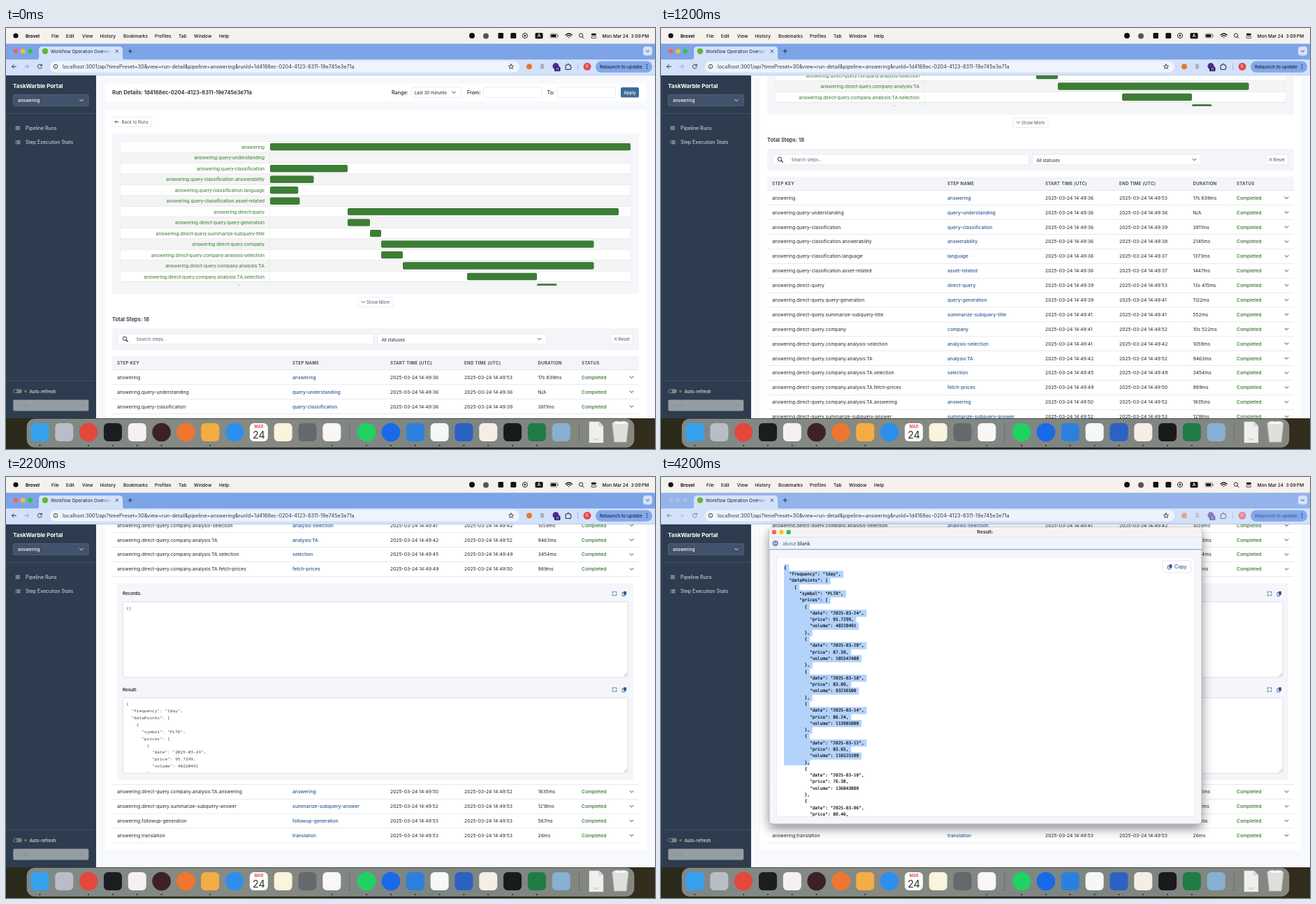
Animation of 929x603 px, one loop 6200 ms. Source, as an HTML page:

```html
<!DOCTYPE html>
<html lang="en">
<head>
<meta charset="utf-8">
<title>Run details</title>
<style>
  html, body { margin: 0; width: 100%; height: 100%; overflow: hidden; }
  svg { display: block; width: 929px; height: 603px; }
  text { white-space: pre; }
  .dense text { stroke: #111; stroke-width: .18px; }
</style>
</head>
<body>
<script>
const UI = 'Inter, sans-serif', CHART = 'Roboto, sans-serif';
const AREA_MONO = "'Noto Sans Mono', monospace", POPUP_MONO = "'DejaVu Sans Mono', monospace";
const INK = '#20252d', SLATE = '#4a5563', LINK = '#2b5797', GREEN = '#3d7d36', SELECTED = '#b3d3fb';

const rect = (x, y, w, h, fill, r = 0, stroke = 'none', sw = .6) =>
  `<rect x="${x}" y="${y}" width="${w}" height="${h}" rx="${r}" fill="${fill}" stroke="${stroke}" stroke-width="${sw}"/>`;
const circle = (x, y, r, fill, stroke = 'none') =>
  `<circle cx="${x}" cy="${y}" r="${r}" fill="${fill}" stroke="${stroke}" stroke-width=".9"/>`;
const path = (d, stroke = INK, sw = .9, fill = 'none') =>
  `<path d="${d}" stroke="${stroke}" stroke-width="${sw}" fill="${fill}" stroke-linecap="round" stroke-linejoin="round"/>`;
// y is the vertical middle of the capitals
const text = (x, y, s, { size = 6.77, weight = 400, fill = INK, font = UI, anchor = 'start', spacing = 0, id = '' } = {}) =>
  `<text ${id && `id="${id}"`} x="${x}" y="${y + size * .36}" font-size="${size}" font-weight="${weight}" fill="${fill}" font-family="${font}" text-anchor="${anchor}" letter-spacing="${spacing}">${
    s.replace(/&/g, '&amp;')}</text>`;
const group = (body, attrs = '') => `<g ${attrs}>${body}</g>`;
const clip = (id, x, y, w, h) => `<clipPath id="${id}">${rect(x, y, w, h, '#000')}</clipPath>`;
const chevron = (x, y, color = INK, s = 2.4) => path(`M${x - s} ${y - s / 2}l${s} ${s}l${s} ${-s}`, color);
const field = (x, y, w, h) => rect(x, y, w, h, '#fff', 2, '#dcdfe6');
const lights = (x, y, gap, colors) => colors.map((c, i) => circle(x + i * gap, y, 3.2, c)).join('');
const LIGHTS = ['#fe5f57', '#febc2e', '#28c840'];
const expandIcon = (x, y) => path(
  `M${x - 2.7} ${y - 1}v-1.7h1.7M${x + 1} ${y - 2.7}h1.7v1.7M${x + 2.7} ${y + 1}v1.7h-1.7M${x - 1} ${y + 2.7}h-1.7v-1.7`, LINK, .9);
const copyIcon = (x, y) => rect(x - 3, y - 1.5, 4, 5, '#fff', .6, LINK, .9) + rect(x - 1, y - 3.2, 4, 5, LINK, .6);
const infoIcon = (x, y) => circle(x, y, 3, 'none', INK) + path(`M${x} ${y}v1.4M${x} ${y - 1.4}v.1`, INK, .8);

const steps = `answering|36|53|17s 839ms
answering.query-understanding|36|36|N/A
answering.query-classification|36|39|3811ms
answering.query-classification.answerability|36|38|2145ms
answering.query-classification.language|36|37|1373ms
answering.query-classification.asset-related|36|37|1447ms
answering.direct-query|39|53|13s 415ms
answering.direct-query.query-generation|39|41|1122ms
answering.direct-query.summarize-subquery-title|41|41|552ms
answering.direct-query.company|41|52|10s 522ms
answering.direct-query.company.analysis-selection|41|42|1059ms
answering.direct-query.company.analysis:TA|42|52|9463ms
answering.direct-query.company.analysis:TA.selection|45|49|3454ms
answering.direct-query.company.analysis:TA.fetch-prices|49|50|989ms
answering.direct-query.company.analysis:TA.answering|50|52|1835ms
answering.direct-query.summarize-subquery-answer|52|53|1218ms
answering.followup-generation|53|53|567ms
answering.translation|53|53|26ms`.split('\n').map(line => line.split('|'));

const bars = [[378, 894], null, [378, 489], [378, 440.5], [378, 418.3], [378, 420.5], [489, 877], [489, 521],
  [521, 537], [537, 841.5], [537, 568], [568, 841.5], [660, 760], [760, 788.5]];

const quotes = [['24', 95.7299, 40220491], ['20', 87.39, 105547400], ['18', 83.89, 93236500], ['14', 86.24, 113985000],
  ['12', 83.65, 116525100], ['10', 76.38, 136843800], ['06', 80.46, 0]];
const json = ['{', '  "frequency": "1day",', '  "dataPoints": [', '    {', '      "symbol": "PLTR",', '      "prices": [',
  ...quotes.flatMap(([day, price, volume]) => ['        {', `          "date": "2025-03-${day}",`,
    `          "price": ${price},`, `          "volume": ${volume}`, '        },'])];

const CHAR = 3.7;
const codeLines = (x, y, pitch, lines, style) => lines.map((s, i) => text(x, y + i * pitch, s, style)).join('');
const codeSelection = (x, y, pitch, lines) => lines.map((s, i) => {
  const isLast = i === lines.length - 1;
  return rect(x, y + (i - .5) * pitch, (s.length + (isLast ? 0 : 1)) * CHAR, pitch + (isLast ? 0 : 1), SELECTED);
}).join('');

const ROW = 20.89, FIRST_ROW = 500.3, OPEN_ROW = 13, DETAIL = 298;

function tableRow([key, start, end, duration], i) {
  const y = FIRST_ROW + i * ROW, time = s => '2025-03-24 14:49:' + s;
  return text(159, y, key) + text(410, y, key.split('.').pop(), { weight: 500, fill: LINK }) +
    text(550, y, time(start)) + text(656, y, time(end)) + text(761.5, y, duration) +
    text(824, y, 'Completed', { weight: 500, fill: '#2f6f2c' }) + chevron(895.5, y) +
    rect(152, y + 10.2, 754, .6, '#d9dce2');
}

function chart() {
  const pitch = 15.475;
  return rect(152, 151, 754, 230, '#f5f6f9', 2) + group(bars.map((bar, i) => {
    const y = 170.3 + i * pitch;
    return rect(164, y - pitch / 2, 730, pitch, i % 2 ? '#f4f4f4' : '#fff', 0, '#e1e2e4', .5) +
      text(370, y, steps[i][0], { size: 7.2, fill: '#3c8035', font: CHART, anchor: 'end' }) +
      (bar ? rect(bar[0], y - 5.2, bar[1] - bar[0], 10.4, GREEN, 2) : '');
  }).join('') + rect(377.5, 162.5, .5, 206, '#e1e2e4'), 'clip-path="url(#chartClip)"');
}

function pageTop() {
  const small = { size: 6.2 }, label = { size: 7.2, weight: 500 };
  const headings = [[159, 'STEP KEY'], [410, 'STEP NAME'], [550, 'START TIME (UTC)'], [656, 'END TIME (UTC)'], [761.5, 'DURATION'], [824, 'STATUS']];
  return rect(142, 80, 774, 25, '#fff', 3) +
    text(152, 92.5, 'Run Details: 1d4168ec-0204-4123-8311-19e745e3e71a', { size: 7.6, weight: 600 }) +
    text(552, 92.3, 'Range:', label) + field(580, 85, 72, 14.5) + text(584.5, 92.3, 'Last 30 minutes', small) + chevron(641, 92.3) +
    text(660, 92.3, 'From:', label) + field(683.5, 85, 83, 14.5) + text(774.5, 92.3, 'To:', label) + field(789.5, 85, 83, 14.5) +
    rect(880, 85, 26, 14.5, '#3b6c98', 2) + text(893, 92.3, 'Apply', { size: 6.3, weight: 500, fill: '#fff', anchor: 'middle' }) +
    group(rect(142, 117, 774, 759, '#fff', 3), 'id="card"') +
    field(152, 127.5, 56.5, 14) + path('M161 134.5h-5m2-2l-2 2l2 2', SLATE) + text(165.5, 134.5, 'Back to Runs', { size: 6.2, fill: SLATE }) +
    chart() +
    field(504, 385.5, 50, 14) + chevron(511.3, 392.5, SLATE) + text(516, 392.5, 'Show More', { size: 6.2, fill: SLATE }) +
    text(152, 417, 'Total Steps: 18', { size: 7.55, weight: 600, fill: '#2b323c' }) +
    rect(152, 430, 754, 31.5, '#f4f5f9', 2) + field(160, 438, 366.5, 14.8) +
    circle(170, 444.8, 2.8, 'none', INK) + path('M172.2 447l2.2 2.2', INK, 1.2) +
    text(186.5, 445.3, 'Search steps...', { size: 6.3, fill: '#59616c' }) +
    field(531.5, 438, 242, 14.8) + text(537.5, 446.3, 'All statuses', small) + chevron(763.5, 445.6) +
    field(866, 438.5, 31.5, 14) + path('M870.8 443.7l3.6 3.6m0-3.6l-3.6 3.6', SLATE, .8) + text(876.5, 445.5, 'Reset', { size: 6.2, fill: SLATE }) +
    rect(152, 470, 754, 19.6, '#f4f5f9') + rect(152, 489.4, 754, .6, '#d9dce2') +
    headings.map(([x, s]) => text(x, 479.6, s, { size: 6.1, weight: 600, spacing: .3, fill: '#353d48' })).join('');
}

// Detail panel, drawn at its place after scrolling
function detail() {
  const title = { size: 6.3, weight: 600 };
  const handle = y => path(`M889 ${y - 4}l-4 4M889 ${y - 2}l-2 2`, '#8b9098', .6);
  const code = { size: 6.17, font: AREA_MONO, fill: '#3c434d' };
  const area = (name, y) => text(167, y, name, title) + expandIcon(871, y) + copyIcon(885, y) +
    rect(167.3, y + 11.8, 723, 108, '#fff', 2.5, '#d5d9e0', .8) + handle(y + 118);
  return rect(159, 152, 739, 282, '#f5f6fa', 2) + area('Records:', 167) + text(172, 187.5, '{}', code) +
    group(rect(865.5, 299, 11, 11, '#d4e2f6', 2), 'id="expandFocus"') + area('Result:', 304.5) +
    group(group(codeSelection(172, 325, 9.89, json.slice(0, 12)), 'id="areaSelection"') +
      codeLines(172, 325, 9.89, json.slice(0, 11), code), 'clip-path="url(#areaClip)"') +
    group(rect(167.5, 316.5, 722.6, 107.2, 'none', 2.5, '#2c5fb3', 1.3), 'id="areaFocus"') +
    rect(152, 440.4, 754, .6, '#d9dce2');
}

function sidebar() {
  const pale = { size: 7, fill: '#dfe4ea' };
  const lines = (x, y, w) => path([-2, 0, 2].map(d => `M${x} ${y + d}h${w}`).join(''), '#dfe4ea', .8);
  return rect(0, 68, 129, 491, '#2d3c4e') +
    text(10, 82.8, 'TaskWarble Portal', { size: 8, weight: 700, fill: '#fff' }) +
    rect(10.3, 95.5, 108, 16, '#42526a', 2, '#64748a') + text(17, 103.5, 'answering', { size: 6.3, weight: 500, fill: '#fff' }) + chevron(108, 103.5, '#fff') +
    rect(0, 122, 129, .6, '#4b5b6d') +
    lines(14, 143.3, 5.5) + text(28, 143.3, 'Pipeline Runs', pale) +
    lines(15.5, 163.7, 4.5) + path('M13.8 161.7v.01M13.8 163.7v.01M13.8 165.7v.01', '#dfe4ea') + text(28, 163.7, 'Step Execution Stats', pale) +
    rect(0, 505, 129, .6, '#4b5b6d') +
    rect(10.3, 517.3, 12.5, 6, '#7b828a', 3) + circle(13.5, 520.3, 2.2, '#2f3c4b') + circle(28, 520.3, 1.9, '#3f8f49') +
    text(33.5, 520.3, 'Auto-refresh', { size: 6.3, fill: '#fff' }) +
    rect(10.3, 532.5, 108, 16, '#959ca4', 2) + text(17, 540.5, '5 sec', { size: 6.3, fill: '#858d96' }) + chevron(108, 540.5, '#7d858e');
}

function menuBar() {
  const items = [[65, 'File'], [86, 'Edit'], [109, 'View'], [134.5, 'History'], [168, 'Bookmarks'], [213, 'Profiles'], [247, 'Tab'], [269, 'Window'], [305, 'Help']];
  const black = '#111', size = 6.5;
  return rect(0, 0, 929, 22.5, '#f5f2ee') + circle(14, 11, 3.6, black) +
    text(28, 11.2, 'Brovel', { size, weight: 700, fill: black }) +
    items.map(([x, s]) => text(x, 11.2, s, { size, weight: 500, fill: black })).join('') +
    circle(667, 11, 4, black) + circle(687, 11.5, 4, '#555') + rect(704.5, 7, 7.5, 8, black, 1) + rect(722.3, 7, 8, 8, black, 1.5) +
    circle(743, 11, 3.6, 'none', black) + path('M742 9.4v3.2l2.6-1.6z', black, .3, black) +
    rect(757.5, 7, 11, 8.3, black, 1.5) + text(763, 11.2, 'A', { size: 6.3, weight: 600, fill: '#fff', anchor: 'middle' }) +
    rect(779, 8.2, 10.5, 5.8, '#f5f2ee', 1.6, '#555', .7) + rect(780, 9.2, 7.5, 3.8, black, .8) + rect(790, 10, .9, 2.2, '#777') +
    path('M801 10q4.6-4 9.2 0M802.8 11.9q2.8-2.4 5.6 0M805.5 13.7h.2', black, 1.3) +
    circle(823, 10.6, 2.7, 'none', black) + path('M825 12.6l2 2', black, 1) +
    rect(837.8, 7.8, 7, 2.8, black, 1.4) + rect(837.8, 11.8, 7, 2.8, '#f5f2ee', 1.4, black, .7) +
    text(853.5, 11.2, '', { size, weight: 500, fill: black, id: 'clock' });
}

function browser() {
  const star = 'M723 51.8l1 2.3l2.5.2l-1.9 1.6l.6 2.5l-2.2-1.4l-2.2 1.4l.6-2.5l-1.9-1.6l2.5-.2z';
  return `<rect id="strip" y="22.5" width="929" height="23"/>` +
    group(lights(14, 33.3, 10.3, LIGHTS), 'id="lightsOn"') + group(lights(14, 33.3, 10.3, Array(3).fill('#a9bde0')), 'id="lightsOff"') +
    path('M43 45.5q4 0 4-4v-10q0-5 5-5h110q5 0 5 5v10q0 4 4 4z', 'none', 0, '#d3e2fa') +
    circle(56, 33.2, 4.2, '#67b52f') +
    group(text(64, 33.3, 'Workflow Operation Overviews', { size: 6.4 }), 'clip-path="url(#tabClip)"') +
    rect(138, 27.5, 13, 12, 'url(#fade)') +
    path('M157 31.5l3.6 3.6m0-3.6l-3.6 3.6', INK, .8) + path('M175 33.2h5.4m-2.7-2.7v5.4', INK, .9) +
    rect(912, 26.5, 13, 13, '#d3e2fa', 4) + chevron(918.5, 33.3, INK, 2) +
    rect(0, 45.3, 929, 22.7, '#d3e2fa') + rect(0, 67.3, 929, .7, '#b4c5e3') +
    rect(63, 47.3, 672, 16.2, '#eef3fc', 8) + circle(71, 55.2, 5.5, '#fff') + infoIcon(71, 55.2) +
    text(81, 55.3, 'localhost:3001/api?timePreset=30&view=run-detail&pipeline=answering&runId=1d4168ec-0204-4123-8311-19e745e3e71a', { size: 7.25, fill: '#333a44' }) +
    path(star, INK, .8) +
    rect(844, 47.5, 81, 16.3, '#82a8ec', 8) +
    group(path('M14.5 55.2h-6m2.7-2.7l-2.7 2.7l2.7 2.7') + path('M26.5 55.2h6m-2.7-2.7l2.7 2.7l-2.7 2.7', '#8e9db8') +
      path('M51 53.6a3 3 0 1 0 .2 2.6M51.3 51.8v2.2h-2.2') +
      circle(749, 55.3, 4, '#e8772c') + rect(765, 51.5, 5, 7, '#a4b0c5', 1) +
      circle(787, 54.7, 4.6, '#4b2a9b') + rect(785, 55.5, 8.5, 6.5, '#33206d', 1.5) + text(789.2, 58.8, '11', { size: 5, fill: '#fff', anchor: 'middle' }) +
      path('M801.5 53h2.3q-.4-1.8 1-1.8t1 1.8h2.4v2.4q1.3 0 1.3 1t-1.3 1v2h-6.7z', INK, 1) +
      rect(818, 50.5, .8, 9.5, '#93afe0') + circle(832, 55.3, 5.5, '#e5484d') + text(832, 55.3, 'K', { size: 5.6, fill: '#fff', anchor: 'middle' }) +
      text(850, 55.3, 'Relaunch to update', { size: 6.6, weight: 500 }), 'id="tools"') +
    [52.6, 55.3, 58].map(y => circle(917.5, y, .8, INK)).join('');
}

function dock() {
  const icons = ['sq#36a1ee', 'sq#b9bdc6', 'ci#e4483b', 'sq#1c1d20', 'sq#f5f1f3', 'ci#3c2227', 'ci#ef7630', 'sq#f4ad45', 'ci#2d8fed', '',
    'sq#fbf4dc', 'sq#65696e', 'sq#f8f7f5', 'ci#20d262', 'ci#196ae8', 'sq#2c80dd', 'sq#f5f8f5', 'sq#2b62c4', 'sq#f4eee7', 'sq#1a1a1c', 'sq#207b47', 'sq#88b0d2'];
  const idle = [1, 6, 8, 9, 10, 11, 21];
  const draw = (icon, i) => {
    const x = 48.5 + i * 34.82 + (i > 12 ? 15 : 0), color = icon.slice(2);
    const shape = !icon ? rect(x - 13, 566, 26, 26, '#fcfcfc', 6) + text(x, 571, 'MAR', { size: 5.6, weight: 600, fill: '#e5423c', anchor: 'middle' }) +
        text(x, 582.3, '24', { size: 14.5, fill: '#333', anchor: 'middle' })
      : icon[0] === 's' ? rect(x - 13, 566, 26, 26, color, 6) : circle(x, 579, 13.3, color);
    return shape + (idle.includes(i) ? '' : circle(x, 598, 1, '#222'));
  };
  return rect(0, 559, 929, 44, 'url(#wall)') + rect(30, 560, 869, 40.5, 'url(#dockFill)', 11, '#969b98', .5) +
    icons.map(draw).join('') + [491.5, 820].map(x => rect(x, 566, .7, 27, '#5f6462')).join('') +
    path('M835 564h14l6 6v24h-20z', '#c4c8cb', .5, '#eef0f0') + path('M849 564v6h6', '#b4b8bb', .6, '#d9dcdd') + text(845, 590, 'TXT', { size: 4, fill: '#9a9fa3', anchor: 'middle' }) +
    path('M868 566h23l-3 27h-17z', '#b9bdbd', .8, '#dde0df') + path('M868 566q4-4 11-2q8-2 12 2q-11 4-23 0', '#c2c6c6', .5, '#f7f8f8');
}

function popup() {
  const code = { size: 6.15, font: POPUP_MONO, fill: '#111' }, pitch = 9.293;
  return rect(155, 72, 619, 425, '#f5f6fa', 5, '#9fa3aa', .8).replace('/>', ' filter="url(#shadow)"/>') +
    path('M155 86v-9q0-5 5-5h609q5 0 5 5v9z', 'none', 0, '#f5f3f1') +
    lights(162, 79, 10.3, LIGHTS) + text(464, 79, 'Result:', { size: 6.7, weight: 700, fill: '#3c3c3c', anchor: 'middle' }) +
    rect(155, 86, 619, 17.5, '#eff3fb') + rect(155, 85.8, 619, .6, '#cbd3e0') + rect(155, 102.9, 619, 1.5, '#a5b3c9') +
    circle(163.7, 95, 5.6, '#d3e2fa') + infoIcon(163.7, 95) +
    `<text x="174" y="97.6" font-size="7.2" font-family="${UI}" fill="#5f6670">about:<tspan fill="${INK}">blank</tspan></text>` +
    rect(165.5, 114.5, 598, 372, '#fff', 3, '#e0e3ea') +
    group(group(codeSelection(176, 129.6, pitch, json.slice(0, 31)), 'id="popupSelection"') +
      group(codeLines(176, 129.6, pitch, json.slice(0, 39), code), 'class="dense"'), 'clip-path="url(#popupClip)"') +
    rect(718, 120, 40.5, 17, '#fff', 2, '#d5d9e0') + copyIcon(728.5, 128.5) + text(735, 128.5, 'Copy', { size: 7, weight: 500, fill: LINK });
}

const gradient = (id, ...stops) => `<linearGradient id="${id}">${stops.map((c, i) =>
  `<stop offset="${i / (stops.length - 1)}" stop-color="${c}"/>`).join('')}</linearGradient>`;

document.body.innerHTML = `<svg viewBox="0 0 929 603"><defs>
  ${clip('pageClip', 129, 68, 800, 491)}${clip('chartClip', 163.5, 162, 731, 207)}${clip('tabClip', 64, 27, 87, 14)}
  ${clip('areaClip', 168, 317, 722, 106.3)}${clip('popupClip', 166, 115, 597, 371)}
  ${gradient('wall', '#2a2a1a', '#2b281b', '#201f17', '#332d1d')}
  ${gradient('dockFill', '#7f8887', '#868a83', '#7d8583', '#85877f')}
  ${gradient('fade', '#d3e2fa00', '#d3e2fa')}
  <filter id="shadow" x="-10%" y="-10%" width="120%" height="125%"><feDropShadow dx="0" dy="6" stdDeviation="8" flood-opacity=".45"/></filter>
</defs>
${group(rect(129, 68, 800, 491, '#f8f9fc') +
  group(pageTop() + steps.slice(0, OPEN_ROW + 1).map(tableRow).join('') +
    group(steps.slice(OPEN_ROW + 1).map((row, i) => tableRow(row, i + OPEN_ROW + 1)).join(''), 'id="lowerRows"'), 'id="page"') +
  group(detail(), 'id="detail"'), 'clip-path="url(#pageClip)"')}
${sidebar()}${dock()}${menuBar()}${browser()}${group(popup(), 'id="popup"')}
</svg>`;

const LOOP = 6200;
const scenes = [
  { at: 0, scroll: 0 },
  { at: 400, scroll: 86, clock: '3:12' },
  { at: 800, scroll: 172.3 },
  { at: 1200, scroll: 257 },
  { at: 1600, scroll: 342 },
  { at: 2200, scroll: 640, open: true },
  { at: 2800, scroll: 640, open: true, areaSelected: true, clock: '3:12' },
  { at: 3600, scroll: 640, open: true, popup: true, expandFocus: true },
  { at: 4200, scroll: 640, open: true, popup: true, popupSelected: true },
];

const el = id => document.getElementById(id);
const show = (id, on) => el(id).setAttribute('visibility', on ? 'visible' : 'hidden');
const moveY = (id, y) => el(id).setAttribute('transform', `translate(0 ${y})`);

function apply(scene) {
  const { scroll, open, popup, areaSelected, popupSelected, expandFocus, clock = '3:09' } = scene;
  moveY('page', -scroll);
  moveY('lowerRows', open ? DETAIL : 0);
  el('card').firstChild.setAttribute('height', 759 + (open ? DETAIL : 0));
  show('detail', open);
  show('areaSelection', areaSelected);
  show('areaFocus', areaSelected);
  show('expandFocus', expandFocus);
  show('popup', popup);
  show('popupSelection', popupSelected);
  show('lightsOn', !popup);
  show('lightsOff', popup);
  el('strip').setAttribute('fill', popup ? '#93b3ea' : '#7da4e6');
  el('tools').setAttribute('opacity', popup ? .55 : 1);
  el('clock').textContent = `Mon Mar 24  ${clock}\u200a PM`.replace('\u200a ', '\u2009');
}

let current;
function tick() {
  const time = performance.now() % LOOP;
  const scene = scenes.findLast(s => s.at <= time);
  if (scene !== current) apply(current = scene);
  requestAnimationFrame(tick);
}
tick();
</script>
</body>
</html>
```
